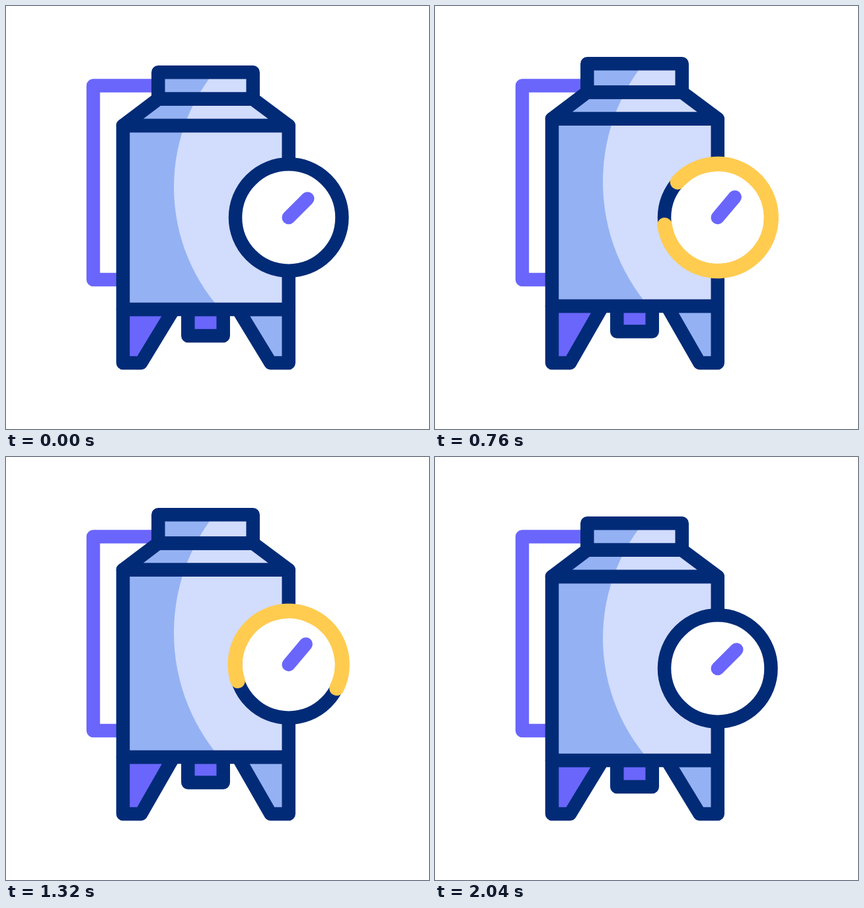
These frames come from a looping animation (640 by 640 pixels, 2240 ms). An HTML page with a canvas:

```html
<!DOCTYPE html>
<html lang="en">
<head>
<meta charset="utf-8">
<title>Brewing tank</title>
<style>
html, body { margin: 0; width: 100%; height: 100%; overflow: hidden; background: #fff; }
canvas { display: block; }
</style>
</head>
<body>
<canvas id="stage" width="640" height="640"></canvas>
<script>
const ctx = document.getElementById('stage').getContext('2d');
const NAVY = '#022b77', PURPLE = '#6a66fc', MID = '#94b2f3', LIGHT = '#d2dcfd', YELLOW = '#ffcc50';
const LOOP = 2240, STEP = 40, LAST = 48, LINE = 20.5;
const L = 177, R = 427.7, CX = 427.7;

const clamp = (v, a, b) => Math.min(b, Math.max(a, v));
const smooth = x => { x = clamp(x, 0, 1); return x * x * (3 - 2 * x); };
const swing = x => (1 - Math.cos(2 * Math.PI * x)) / 2;
const rad = deg => deg * Math.PI / 180;

function poly(points, closed = true) {
  const path = new Path2D();
  points.forEach(([x, y]) => path.lineTo(x, y));
  if (closed) path.closePath();
  return path;
}

function paint(path, fill, stroke = NAVY, width = LINE) {
  if (fill) { ctx.fillStyle = fill; ctx.fill(path); }
  if (stroke) { ctx.strokeStyle = stroke; ctx.lineWidth = width; ctx.stroke(path); }
}

// Rise to a stretched pose, shake around it, settle back
function stretchAt(k) {
  if (k < 6) return smooth(k / 6);
  if (k > 42) return smooth((LAST - k) / 6);
  const wave = Math.sin((k - 6) * Math.PI / 2);
  return 1 + wave * (wave > 0 ? 0.44 : 0.64);
}

function needleAt(k) {
  if (k < 1 || k > 43) return 45;
  const x = (k - 1) / 3.5 % 2;
  return 45 + 25 * smooth(x < 1 ? x : 2 - x);
}

function drawTank(d) {
  const top = 100.3 - 13 * d, neck = 140.8 - 10.4 * d, shoulder = 181 - 10.3 * d;
  const base = 459 - 5 * d, spout = 499 - 6.5 * d;

  paint(poly([[230, 120.5], [132, 120.5], [132, 414], [L, 414]], false), null, PURPLE);
  paint(poly([[275.3, base], [275.3, spout], [328.7, spout], [328.7, base]]), PURPLE);
  paint(poly([[L, base], [L, 540], [204.3, 540], [253.6, base]]), PURPLE);
  paint(poly([[R, base], [R, 540], [400.3, 540], [351, base]]), MID);

  const cap = poly([[230.3, top], [373.7, top], [373.7, neck], [230.3, neck]]);
  const slope = poly([[230.3, neck], [373.7, neck], [R, shoulder], [L, shoulder]]);
  const body = poly([[L, shoulder], [R, shoulder], [R, base], [L, base]]);
  const shine = new Path2D();
  shine.ellipse(533, 274 - 8 * d, 279, 279 * (1 + 0.0236 * d), 0, 0, 2 * Math.PI);
  for (const part of [cap, slope, body]) {
    paint(part, MID, null);
    ctx.save();
    ctx.clip(part);
    paint(shine, LIGHT, null);
    ctx.restore();
  }
  for (const part of [cap, slope, body]) paint(part);
}

// A turning arc whose head runs round first and whose tail catches up
function drawArc(k, cy) {
  const x = (k - 5.2) / 22.6;
  if (x <= 0 || x >= 1) return;
  const turn = 180 + 250 * (0.8 * smooth(x) + 0.2 * x);
  const head = turn + 360 * smooth((k - 5.2) / 13.4);
  const tail = turn + 360 * smooth((k - 14.4) / 13.4);
  const arc = new Path2D();
  arc.arc(CX, cy, 81, rad(tail - 90), rad(head - 90));
  paint(arc, null, YELLOW, 22.5);
}

function drawGauge(k) {
  const cy = 320 - 12 * swing(k / 8);
  const ring = new Path2D();
  ring.arc(CX, cy, 80.7, 0, 2 * Math.PI);
  paint(ring, '#fff');
  drawArc(k, cy);
  drawArc(k - 17, cy);
  const a = rad(needleAt(k));
  paint(poly([[CX, cy], [CX + 40.3 * Math.cos(a), cy - 40.3 * Math.sin(a)]], false), null, PURPLE);
}

function draw(ms) {
  const k = clamp(Math.floor(ms % LOOP / STEP) - 3, 0, LAST);
  ctx.fillStyle = '#fff';
  ctx.fillRect(0, 0, 640, 640);
  ctx.lineCap = ctx.lineJoin = 'round';
  drawTank(stretchAt(k));
  drawGauge(k);
}

const start = performance.now();
function tick() {
  draw(performance.now() - start);
  requestAnimationFrame(tick);
}
tick();
</script>
</body>
</html>
```
